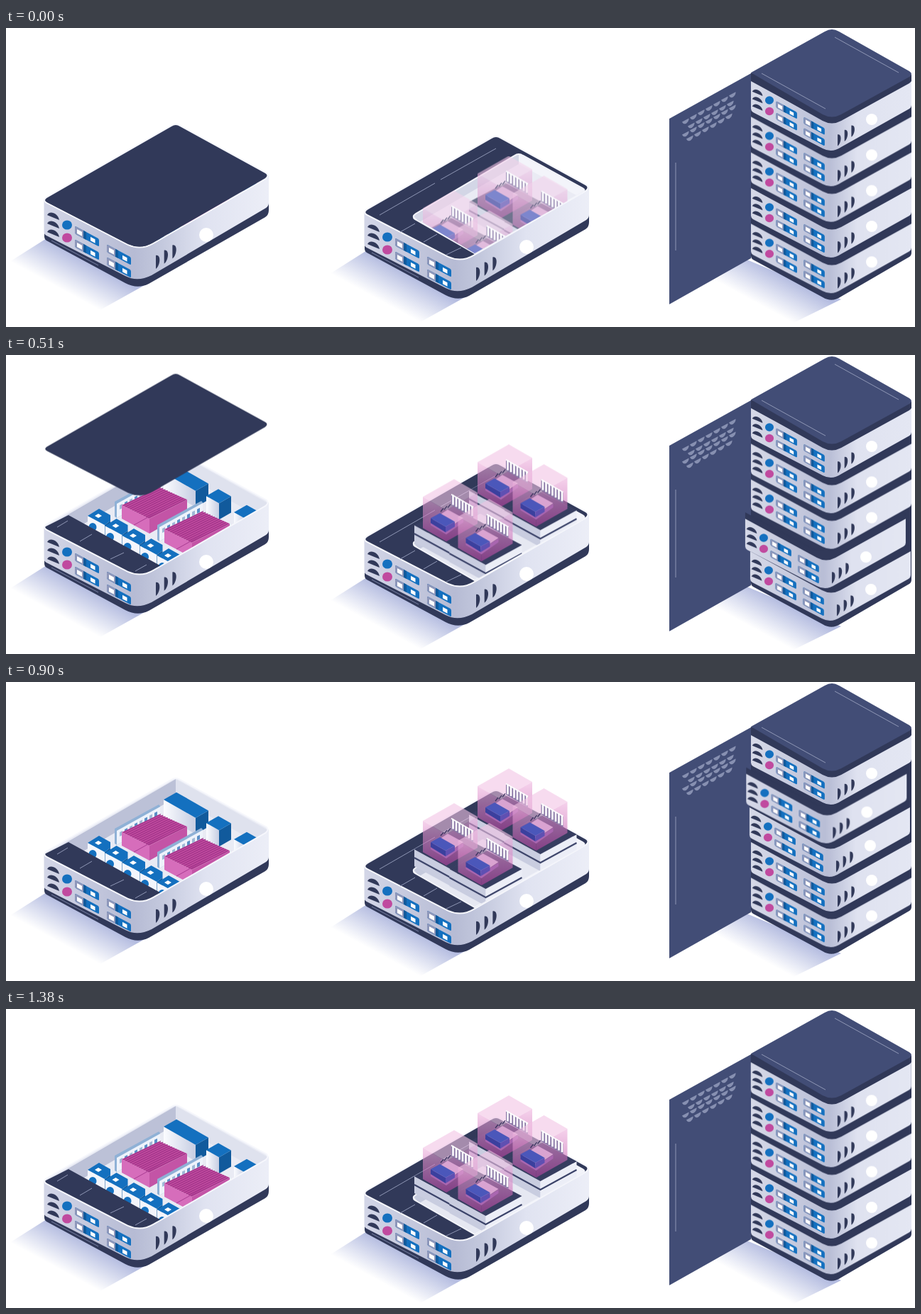
Write an HTML page that moves like this. It is 1280x422 px and loops after 2700 ms.

```html
<!DOCTYPE html>
<html lang="en">
<head>
<meta charset="utf-8">
<title>Modular servers</title>
<style>
  html, body { margin: 0; width: 100%; height: 100%; overflow: hidden; background: #fff; }
  svg { display: block; width: 100vw; height: 100vh; }
  .lid { animation: lift 2.7s infinite, fade 2.7s linear infinite; }
  .modules { animation: rise 2.7s infinite; }
  .glass { animation: clear 2.7s linear infinite; }
  .unit { animation: slide 2.7s infinite; }
  @keyframes lift {
    0%, 2.222% { transform: translateY(0); animation-timing-function: cubic-bezier(.22, 1, .36, 1); }
    44.8%, 100% { transform: translateY(-121px); }
  }
  @keyframes fade {
    0%, 24.444% { opacity: 1; }
    33.333%, 100% { opacity: 0; }
  }
  @keyframes rise {
    0%, 6.667% { transform: translateY(58.5px); animation-timing-function: cubic-bezier(.22, 1, .36, 1); }
    35.9%, 100% { transform: translateY(0); }
  }
  @keyframes clear {
    0%, 2.222% { opacity: .3; }
    6.667%, 100% { opacity: 0; }
  }
  @keyframes slide {
    0%, 3.333% { transform: translate(0, 0); animation-timing-function: cubic-bezier(.33, .2, .67, .6); }
    11.852% { transform: translate(-9px, 5.8px); animation-timing-function: cubic-bezier(.33, .4, .67, .8); }
    20.37%, 100% { transform: translate(0, 0); }
  }
</style>
</head>
<body>
<svg id="stage" viewBox="0 0 1280 422" xmlns="http://www.w3.org/2000/svg">
  <defs>
    <linearGradient id="caseFill">
      <stop offset="0" stop-color="#d3d6e7"/><stop offset=".4" stop-color="#b6bbd4"/>
      <stop offset=".52" stop-color="#c3c8dd"/><stop offset=".72" stop-color="#e0e3f1"/>
      <stop offset="1" stop-color="#eceef7"/>
    </linearGradient>
    <linearGradient id="unitFill">
      <stop offset="0" stop-color="#d6d9e8"/><stop offset=".49" stop-color="#b9bed6"/>
      <stop offset=".66" stop-color="#dfe2f0"/><stop offset="1" stop-color="#e4e7f3"/>
    </linearGradient>
    <linearGradient id="shade" gradientUnits="userSpaceOnUse" x1="122" y1="333" x2="97" y2="379">
      <stop offset="0" stop-color="#b4bce0"/><stop offset="1" stop-color="#b4bce0" stop-opacity="0"/>
    </linearGradient>
    <linearGradient id="boxFill" x2="0" y2="1">
      <stop offset="0" stop-color="#eeb3de" stop-opacity=".6"/><stop offset="1" stop-color="#b8419f" stop-opacity=".6"/>
    </linearGradient>
    <linearGradient id="whiteFace">
      <stop offset="0" stop-color="#fbfcff"/><stop offset="1" stop-color="#c6cde2"/>
    </linearGradient>
    <clipPath id="inside"><use href="#top"/></clipPath>
    <clipPath id="well"><path d="M570 0V263L573 266L660 318L817 229V0Z"/></clipPath>
    <path id="top" d="M59 239L233 139Q239 135 245 139L365 205Q370 208 365 212L207 303Q190 313 172 305L58 246Q52 243 59 239Z"/>
  </defs>
</svg>
<script>
const NAVY = '#313959', SLATE = '#424d76', BLUE = '#1470bf', DEEP = '#115a9c', PINK = '#c04a9f', PALE = '#8f97b5';

const poly = (fill, pts, more = '') => `<polygon fill="${fill}" points="${pts}" ${more}/>`;
const path = (fill, d, more = '') => `<path fill="${fill}" d="${d}" ${more}/>`;
const line = (d, color = PALE, w = 1) => path('none', d, `stroke="${color}" stroke-width="${w}"`);
const group = (transform, body) => `<g transform="${transform}">${body}</g>`;
const move = (x, y, body) => group(`translate(${x} ${y})`, body);
const times = (n, f) => Array.from({ length: n }, (_, i) => f(i)).join('');

// Front panel: vents, buttons and drive slots
const slot = (x, y) => group(`matrix(1 .54 0 1 ${x} ${y})`, `
  <rect x="-17" y="-5.5" width="34" height="11" rx="2" fill="${BLUE}"/>
  <rect x="-17" y="-5.5" width="14" height="11" rx="2" fill="#8e97ba"/>
  <rect x="-14" y="-2.5" width="7" height="6" fill="#fff"/>
  <rect x="-5" y="-5.5" width="4" height="11" fill="${DEEP}"/>
  <rect x="5" y="-2" width="6.5" height="5.5" fill="#fff"/>`);

const panel = times(3, i => move(66, 265 + i * 12, path(NAVY, 'M-8 -1C-5 -8 7 -4 9 6Z'))) +
  `<ellipse cx="86" cy="278" rx="7" ry="6.6" fill="${BLUE}"/>
   <ellipse cx="86" cy="296" rx="7" ry="6.6" fill="${PINK}"/>` +
  slot(114, 294) + slot(114, 313) + slot(159, 320) + slot(159, 338);

const sideVents = (x, y, dx, dy, k) => times(3, i =>
  group(`translate(${x + i * dx} ${y + i * dy}) scale(${k})`, path(NAVY, 'M0 -9C8 -11 6 6 0 10Z')));

const badge = (x, y, r) => `<circle cx="${x}" cy="${y}" r="${r}" fill="#fff"/>`;

const shell = poly('url(#shade)', '57,297 5,330 120,405 197,362') +
  path(NAVY, 'M54 270V295Q54 298 57 300L168 360Q185 369 201 361L365 267Q370 264 370 257V240L190 300Z') +
  path('url(#caseFill)', 'M53.5 243V288Q53.5 291 57 293L168 350Q185 359 205 349L366 254Q370 251 370 247V208L190 300Z') +
  line('M64 300L130 335', '#8c95b8', .8) +
  '<use href="#top" fill="#f6f7fc" stroke="#f6f7fc" stroke-width="4"/>' +
  panel + sideVents(211, 330, 11.7, -7.3, 1) + badge(282, 292, 10);

// Open server
const fan = i => move(i * 24.5, i * 14,
  poly('#f3f5fb', '115,227 139,240 139,266 115,252') +
  poly(DEEP, '139,240 147,234 147,262 139,266') +
  poly(BLUE, '115,227 131,217 147,226 147,234 139,240') +
  `<ellipse cx="122" cy="243" rx="5.5" ry="6" fill="${BLUE}"/>` +
  poly('#fff', '125,227 130,224 135,227 130,230'));

const sink = (dx, dy) => move(dx, dy,
  poly('#d66dbb', '163,212 202,231 202,252 163,231') +
  poly('#c354a6', '202,231 255,204 255,222 202,252') +
  poly(PINK, '163,212 216,187 255,204 202,231') +
  times(12, i => line(`M${165 + i * 3.2} ${212.5 + i * 1.6}l53 -26`, '#9c3286', 1.1)) +
  line('M180 240L234 210', '#a93c92', 1));

const card = (dx, dy) => move(dx, dy,
  poly('#8fb1d6', '153,207 215,173 217,175 217,196 156,230 153,228') +
  poly('#eef3fb', '156,210 217,176 217,196 156,230') +
  times(8, i => poly(i % 2 ? '#5b8fc6' : '#9fb8d6', `${160 + i * 7},${212 - i * 3.9} ${164 + i * 7},${210 - i * 3.9} ${164 + i * 7},${216 - i * 3.9} ${160 + i * 7},${218 - i * 3.9}`)));

const crate = (x, y, a, b, h) => {
  const s = .57, fx = x + a, fy = y + a * s, rx = fx + b, ry = fy - b * s;
  return poly('url(#whiteFace)', `${x},${y} ${fx},${fy} ${fx},${fy + h} ${x},${y + h}`) +
    poly(DEEP, `${fx},${fy} ${rx},${ry} ${rx},${ry + h} ${fx},${fy + h}`) +
    poly(BLUE, `${x},${y} ${x + b},${y - b * s} ${rx},${ry} ${fx},${fy}`);
};

const openServer = shell + `<g clip-path="url(#inside)">` +
  poly('#e9ebf4', '50,240 239,130 375,209 190,320') +
  poly('#bcc1d7', '50,247 239,137 239,163 50,273') +
  poly('#dfe2ee', '239,137 372,211 372,237 239,163') +
  card(0, 0) + crate(222, 166, 45, 18, 23) + sink(0, 0) + card(60, 33) +
  crate(282, 199, 18, 17, 23) + crate(321, 222, 16, 18, 22) + sink(60, 34) +
  times(5, fan) +
  poly(NAVY, '50,245 88,226 224,301 190,322') +
  line('M72 243L87 234M104 263L121 253M147 288L166 279M182 305L198 296') +
  '</g>' + `<use class="lid" href="#top" fill="${NAVY}"/>`;

// Server with rising modules, absolute coordinates
const chip =
  poly('#a966b0', '598,230 620,242 644,227 644,232 620,249 598,236') +
  poly('#d9a3d1', '598,230 622,214 644,226 620,242') +
  poly('#3b409e', '598,226 619,238 619,246 598,233') +
  poly('#5f50b2', '619,238 632,231 632,238 619,246') +
  poly('#4b57ba', '598,226 611,219 632,231 619,238') +
  times(3, i => line(`M${612 + i * 5} ${217 - i * 2.8}l4 -5`, '#39355f', 1.3));

const fence = poly('#8a78a6', '627,202 658,220 658,236 627,218') +
  times(7, i => line(`M${629.5 + i * 4.5} ${203.5 + i * 2.6}v14`, '#fff', 2.6)) +
  line('M627 202.5L658 220.5', '#fff', 1.8);

const box = poly('#f2c4e5', '631,171 664,190 620,215 587,196', 'opacity=".6"') +
  poly('url(#boxFill)', '587,196 620,215 620,259 587,240') +
  poly('url(#boxFill)', '620,215 664,190 664,234 620,259');

const tile = poly('#c9cde0', '575,236 626,264 626,288 575,260') +
  poly('#eceef7', '626,264 677,236 677,260 626,288') +
  line('M575 248L626 276L677 248', '#3b4369', 2) +
  poly('#363d60', '626,209 677,236 626,264 575,236');

const module = (dx, dy) => move(dx, dy, tile + box + chip + move(0, -10, fence));

const hole = 'M577 262L716 180Q722 176 728 180L812 226Q817 229 812 232L660 318L576 270Q571 266 577 262Z';

const moduleServer = move(451, 17, shell + `<use href="#top" fill="${NAVY}"/>`) +
  path('#e6e8f2', hole) +
  poly('#c5cadd', '574,265 722,178 722,192 582,274') +
  poly('#f3f4fa', '722,178 815,229 803,236 722,192') +
  poly('#cdd1e1', '760,250 772,245 780,249 768,256') +
  poly('#cdd1e1', '666,262 690,250 708,262 684,276') +
  path('none', hole, 'stroke="#f3f4fa" stroke-width="2"') +
  line('M526 264L604 219M612 214L690 170M555 288L576 276M588 302L607 291M620 320L641 310') +
  `<g clip-path="url(#well)"><g class="modules">` +
  module(77, -49) + module(126.5, -21) + module(0, 0) + module(49.5, 28) + '</g></g>' +
  path('#f4f5fb', hole, 'class="glass"');

// Rack
const unit = i => move(0, 50.3 * i, `<g class="unit" style="animation-delay:${(4 - i) * 210}ms">` +
  path(NAVY, 'M1049 66L1150 120L1176 120L1272 66Q1275 66 1275 70V90L1163 160L1049 100Z') +
  path('url(#unitFill)', 'M1049 75L1150 130Q1163 137 1176 130L1275 75V109Q1275 112 1272 114L1176 168Q1163 177 1150 170L1052 119Q1049 117 1049 114Z') +
  group('translate(1000.6 -138.5) scale(.865)', panel) +
  sideVents(1171, 158, 9.7, -6.4, .85) + badge(1219, 129, 8) + '</g>');

const bowls = [[957, 132, 7], [965, 138, 6], [957, 150, 7], [963, 156, 6]].map(([x, y, n]) =>
  times(n, i => move(x + i * 11, y - i * 6.2, path('#8790b1', 'M-5 .5L4.5 -4.5C5 1 -2 7 -5 .5Z')))).join('');

const rack = move(984, 22, poly('url(#shade)', '57,304 5,340 115,399 192,361')) +
  poly(SLATE, '934,128 1049,64 1049,325 934,390') + bowls + line('M943 190V314') +
  path(NAVY, 'M1049 66L1163 120L1275 66V317Q1275 321 1272 323L1176 379Q1163 388 1150 380L1052 327Q1049 325 1049 322Z') +
  times(5, i => unit(4 - i)) +
  path(NAVY, 'M1049 63V74L1150 131Q1163 138 1176 131L1272 78Q1275 76 1275 73V66L1163 100Z') +
  path(SLATE, 'M1049 63L1153 5Q1163 -1 1173 5L1272 61Q1278 65 1272 69L1176 122Q1163 129 1150 122Z') +
  line('M1167 13L1257 63M1064 64L1154 114');

document.getElementById('stage').insertAdjacentHTML('beforeend', openServer + moduleServer + rack);
</script>
</body>
</html>
```
